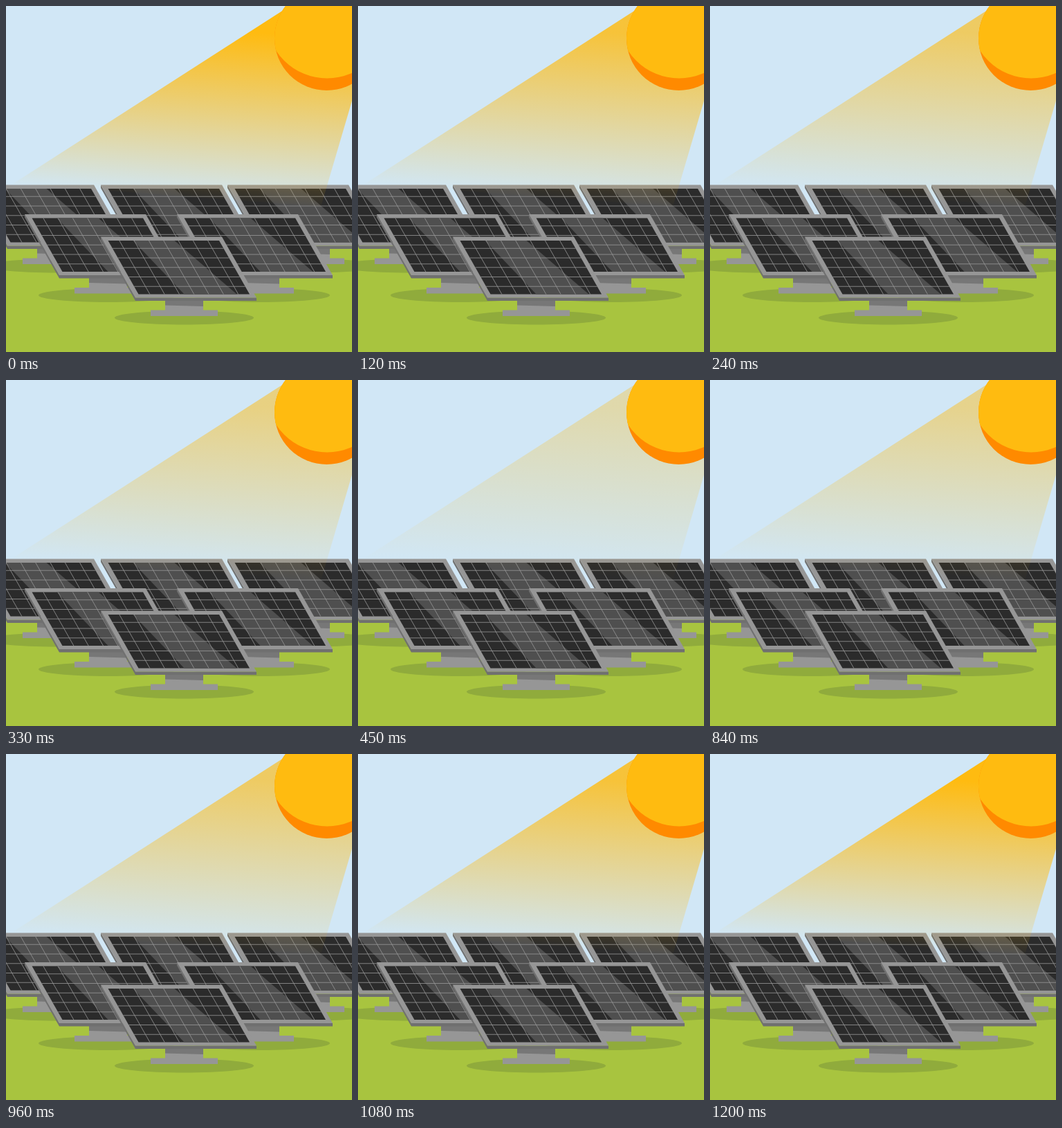
Animation, 500 px wide and 500 px high, one loop 1.53 s. Source, as an HTML page:

```html
<!DOCTYPE html>
<html lang="en">
<head>
<meta charset="utf-8">
<title>Solar panels</title>
<style>
  html, body { margin: 0; width: 100%; height: 100%; overflow: hidden; }
  svg { display: block; width: 100vw; height: 100vh; }
</style>
</head>
<body>
<svg viewBox="0 0 500 500">
  <defs>
    <linearGradient id="fade" gradientUnits="userSpaceOnUse" x1="400" y1="41" x2="382" y2="288">
      <stop offset="0" stop-color="#ffbb10"/>
      <stop offset="1" stop-color="#ffbb10" stop-opacity="0"/>
    </linearGradient>
    <clipPath id="disc"><circle cx="463.5" cy="46.5" r="75.500"/></clipPath>
    <g id="panel">
      <ellipse cx="120.5" cy="117" rx="100.5" ry="10" fill="#90ab3c"/>
      <path d="M93 90h55v16h21v8.500H72V106h21z" fill="#969696"/>
      <path d="M93 90h55v10.500L93 99z" fill="#777"/>
      <path d="M0 0V4.500L50 92.500H225V88H50z" fill="#707070"/>
      <path d="M0 0H175L225 88H50z" fill="#969696"/>
      <g transform="matrix(1 0 .568 1 10.500 5.500)">
        <path d="M0 0H160.500V77.500H0z" fill="#2b2b2b"/>
        <path d="M36 0H96L142 77.500H66z" fill="#4f4f4f"/>
        <path id="grid" stroke="#999" stroke-width=".7"/>
      </g>
    </g>
  </defs>

  <path d="M0 0H500V330H0z" fill="#d1e7f6"/>
  <path d="M0 320H500V500H0z" fill="#a8c43f"/>
  <use href="#panel" x="-48" y="258.500"/>
  <use href="#panel" x="137" y="258.500"/>
  <use href="#panel" x="320" y="258.500"/>
  <use href="#panel" x="27" y="301"/>
  <use href="#panel" x="247" y="301"/>
  <use href="#panel" x="137" y="333.500"/>
  <path id="beam" d="M10 257L400 6.500L500 0V137L455 290z" fill="url(#fade)"/>
  <g clip-path="url(#disc)">
    <path d="M380 0H500V130H380z" fill="#ff8a00"/>
    <circle cx="464" cy="16.500" r="88" fill="#ffbb10"/>
  </g>
</svg>
<script>
  const LOOP = 1530, HALF = 600, STEP = 30, MIN = 0.1;
  const W = 160.5, H = 77.5, CELL_W = 21.3, CELL_H = 13.75;
  const beam = document.getElementById('beam');

  // Grid lines spread out from the middle, so the outer cells are narrower.
  let lines = '';
  for (let c = -3; c <= 3; c++) lines += `M${W / 2 + c * CELL_W} 0v${H}`;
  for (let r = -2; r <= 2; r++) lines += `M0 ${H / 2 + r * CELL_H}h${W}`;
  document.getElementById('grid').setAttribute('d', lines);

  // The beam dims, brightens again, then rests at full strength.
  function draw(now) {
    const t = Math.floor(now % LOOP / STEP) * STEP;
    const level = Math.min(1, Math.abs(t - HALF) / HALF);
    beam.setAttribute('opacity', MIN + (1 - MIN) * level);
    requestAnimationFrame(draw);
  }
  draw(performance.now());
</script>
</body>
</html>
```
